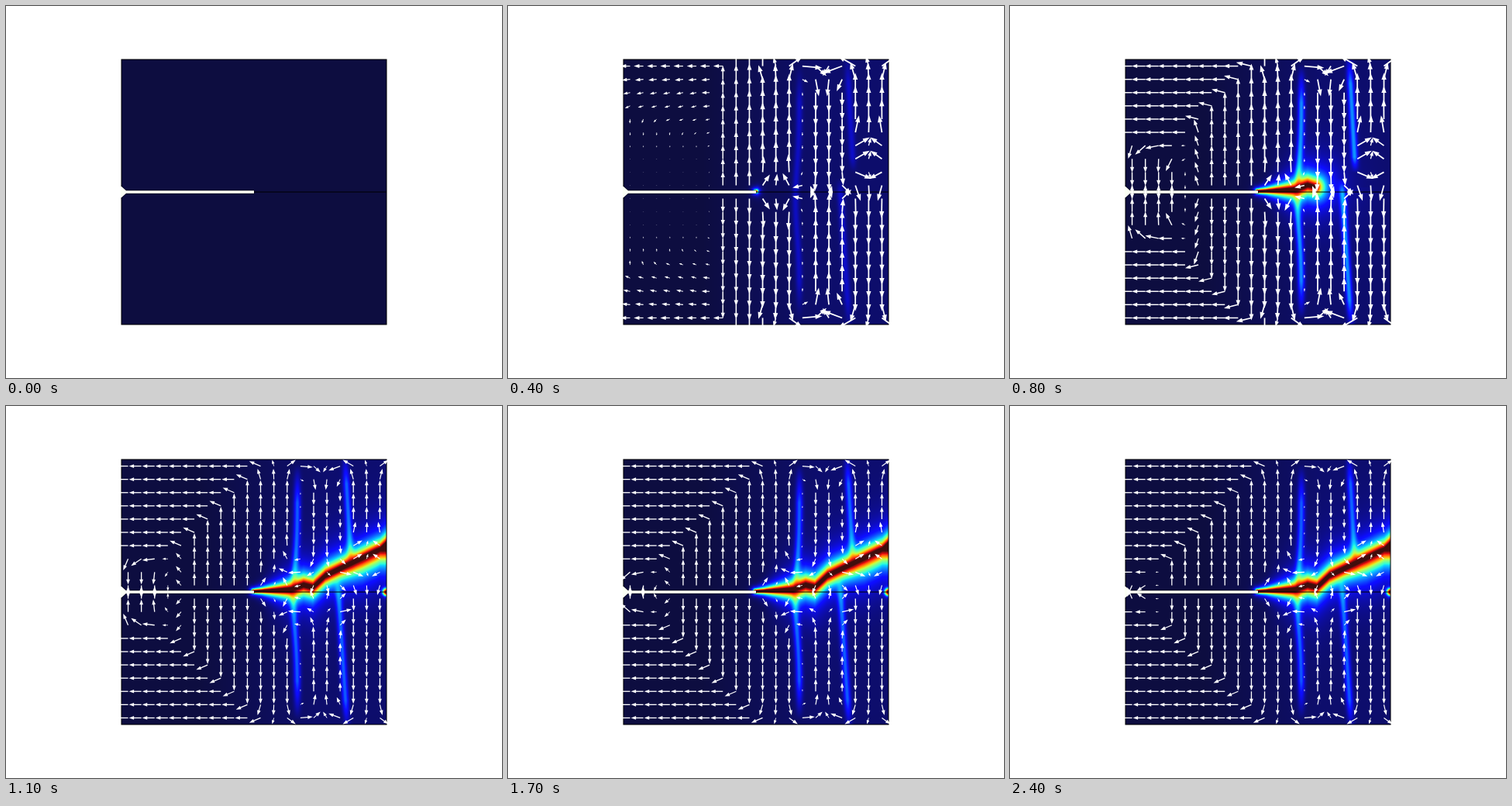
These frames come from a looping animation (640x480 px, 2500 ms). An HTML page with a canvas:

```html
<!DOCTYPE html>
<html>
<head>
<meta charset="utf-8">
<title>Crack growth in a notched plate</title>
<style>
html, body { margin: 0; width: 100%; height: 100%; overflow: hidden; background: #fff; }
canvas { display: block; }
</style>
</head>
<body>
<canvas id="stage" width="640" height="480"></canvas>
<script>
const ctx = document.getElementById('stage').getContext('2d');
const LEFT = 149, TOP = 69, SIZE = 342, CELLS = 20, CELL = SIZE / CELLS;
const NOTCH = 319, STEPS = 25, LAST_GROWTH = 11;

const clamp = v => Math.max(0, Math.min(1, v));
const bell = v => Math.exp(-v * v);

// Rainbow from navy to dark red: each channel is a clipped tent around its centre
const tent = (v, center, top, slope) =>
  255 * Math.max(.05, Math.min(1, top - slope * Math.abs(v - center)));
const rainbow = v => [tent(v, .73, 1.3, 3.9), tent(v, .52, 1.3, 4), tent(v, .3, 1.39, 3.8)];

const crackPoints = [[319, 239], [368, 237], [384, 231], [396, 234], [412, 219], [491, 181]];

function crackY(x) {
  let n = 1;
  while (n < crackPoints.length - 1 && x > crackPoints[n][0]) n++;
  const [ax, ay] = crackPoints[n - 1], [bx, by] = crackPoints[n];
  return ay + (by - ay) * clamp((x - ax) / (bx - ax));
}

// Damage left by the two vertical stress waves
function bands(x, y) {
  const near = bell((x - 376 + 5 * bell((y - 250) / 60)) / 4.5) *
    clamp((165 - Math.abs(y - 240)) / 50);
  const upper = y < 222;
  const mid = upper ? 438 + (y - 75) * .055 : 429 + (y - 240) * .065;
  const far = bell((x - mid) / 4.5) * clamp((upper ? 215 - y : y - 222) / 20) *
    clamp((180 - Math.abs(y - 240)) / 40);
  return Math.max(near, far);
}

function damage(x, y, step, tip) {
  let sound = 1 - .045 * clamp(step / 4) * clamp((x - 250) / 150);
  if (x < 300 || !step) return 1 - sound;
  const cx = Math.max(NOTCH, Math.min(tip, x));
  const dy = y - crackY(cx);
  const radius = .8 + 1.5 * clamp((cx - 330) / 40) * clamp((tip - cx) / 20 + .3) +
    Math.max(0, cx - 483) * .5;
  const d = Math.max(0, Math.hypot(x - cx, dy * .88) - radius);
  const spread = dy > 0 ? 1 + .5 * clamp((x - 430) / 30) : 1;
  const reach = 9 * spread * Math.min(1, .25 + clamp((cx - NOTCH) / 80));
  sound *= 1 - clamp(step / 6) * Math.exp(-d / reach);
  sound *= 1 - .22 * clamp((cx - 330) / 50) * Math.exp(-d / 25);
  const strength = step < 8 ? .1 + .05 * (step - 4) : Math.max(.25, .3 - .02 * (step - 8));
  sound *= 1 - Math.max(0, strength) * bands(x, y);
  if (tip > 490) sound *= 1 - bell(Math.hypot(x - 491, y - 240) / 5);
  return 1 - sound;
}

function damageImage(step) {
  const image = ctx.createImageData(SIZE, SIZE);
  const tip = 321 + 170 * clamp((step - 4) / 7) ** 1.5;
  for (let row = 0, p = 0; row < SIZE; row++) {
    for (let col = 0; col < SIZE; col++, p += 4) {
      image.data.set(rainbow(damage(LEFT + col + .5, TOP + row + .5, step, tip)), p);
      image.data[p + 3] = 255;
    }
  }
  return image;
}

// Flow ahead of the notch: a row of counter-rotating cells, given for the upper half
function cellFlow(col, row, surge) {
  const far = col > 16;
  const upper = row < (far ? 7.5 : 9.5);
  const m = upper ? row : CELLS - 1 - row;
  const phase = (col - 12.9) * 2 * Math.PI / 7;
  const center = far ? (upper ? 6.5 : 11.3) : 10 - 2 * (1 - surge) * clamp((col - 10) / 2);
  const turn = bell((m - center) / 1.2);
  const edge = bell(m / .9);
  const rise = Math.max(-1, Math.min(1, -2 * Math.sin(phase)));
  const vx = Math.cos(phase) * (edge - turn);
  const vy = -rise * (1 - .5 * edge - .7 * turn);
  return [vx, upper ? vy : -vy, Math.min(1, Math.hypot(vx, vy))];
}

// Flow behind the crack tip: a swirl that shrinks towards the mouth of the notch
function swirlFlow(col, row, step, early) {
  const upper = row < CELLS / 2, m = upper ? row : CELLS - 1 - row;
  const center = 1.5 + 6.8 * Math.exp(-step / 8.5);
  const corner = Math.max(center + .4, 10 - .45 * Math.max(0, 10 - step) - m);
  const up = clamp(col - corner + .3);
  const down = col < center ? clamp((m - 10 + center) * .8 + (center - col - 2) * .3) : 0;
  const vx = down + up - 1;
  const vy = down - up + early * .1 * m * (1 - up);
  const swirl = m > 9.5 - center ? clamp(Math.abs(col - center) * .7 + .2) : 1;
  const weak = .7 * Math.max(.06, 1 - m / 7.5);
  const size = swirl + (weak - swirl) * early * (1 - up);
  return [vx, upper ? vy : -vy, size];
}

function arrow(x, y, angle, length, width) {
  if (length < .5) return;
  const head = Math.min(6.5 * width, length * .6), half = head * .36;
  ctx.save();
  ctx.translate(x, y);
  ctx.rotate(angle);
  ctx.lineWidth = width * Math.min(1.3, .3 + length / 16);
  ctx.beginPath();
  ctx.moveTo(0, 0);
  ctx.lineTo(length - head * .6, 0);
  ctx.stroke();
  ctx.beginPath();
  ctx.moveTo(length, 0);
  ctx.lineTo(length - head, half);
  ctx.lineTo(length - head, -half);
  ctx.fill();
  ctx.restore();
}

function drawArrows(step) {
  const early = clamp((8 - step) / 4);
  const surge = clamp((LAST_GROWTH - step) / 3);
  ctx.save();
  ctx.beginPath();
  ctx.rect(148, 68, 345, 344);
  ctx.clip();
  ctx.strokeStyle = ctx.fillStyle = '#fff';
  for (let row = 0; row < CELLS; row++) {
    for (let col = 0; col < CELLS; col++) {
      const behind = col < 10 || (col === 10 && row % (CELLS - 1) === 0);
      const [vx, vy, size] = behind ? swirlFlow(col, row, step, early) : cellFlow(col, row, surge);
      const gain = clamp(step / 3) * (1 + surge * (.1 + .5 * clamp((col - 7) / 6)));
      arrow(LEFT + (col + .5) * CELL, TOP + (row + .5) * CELL,
        Math.atan2(vy, vx), 16 * gain * size, Math.min(1.35, gain));
    }
  }
  ctx.restore();
}

function drawPlate() {
  ctx.strokeStyle = '#000';
  ctx.lineWidth = 1;
  ctx.strokeRect(LEFT, TOP, SIZE, SIZE);
  ctx.beginPath();
  ctx.moveTo(NOTCH, 240);
  ctx.lineTo(LEFT + SIZE, 240);
  ctx.stroke();
  ctx.beginPath();
  for (const [x, y] of [[148, 232], [155, 238.2], [320, 238.2], [320, 241.8], [155, 241.8], [148, 248]])
    ctx.lineTo(x, y);
  ctx.stroke();
  ctx.fillStyle = '#fbfff5';
  ctx.fill();
}

const images = [];
const start = performance.now();
let shown = -1;

function draw() {
  const step = Math.floor((performance.now() - start) / 100) % STEPS;
  if (step !== shown) {
    shown = step;
    const stage = Math.min(step, LAST_GROWTH);
    images[stage] ||= damageImage(stage);
    ctx.fillStyle = '#fff';
    ctx.fillRect(0, 0, 640, 480);
    ctx.putImageData(images[stage], LEFT, TOP);
    drawPlate();
    drawArrows(step);
  }
  requestAnimationFrame(draw);
}
draw();
</script>
</body>
</html>
```
